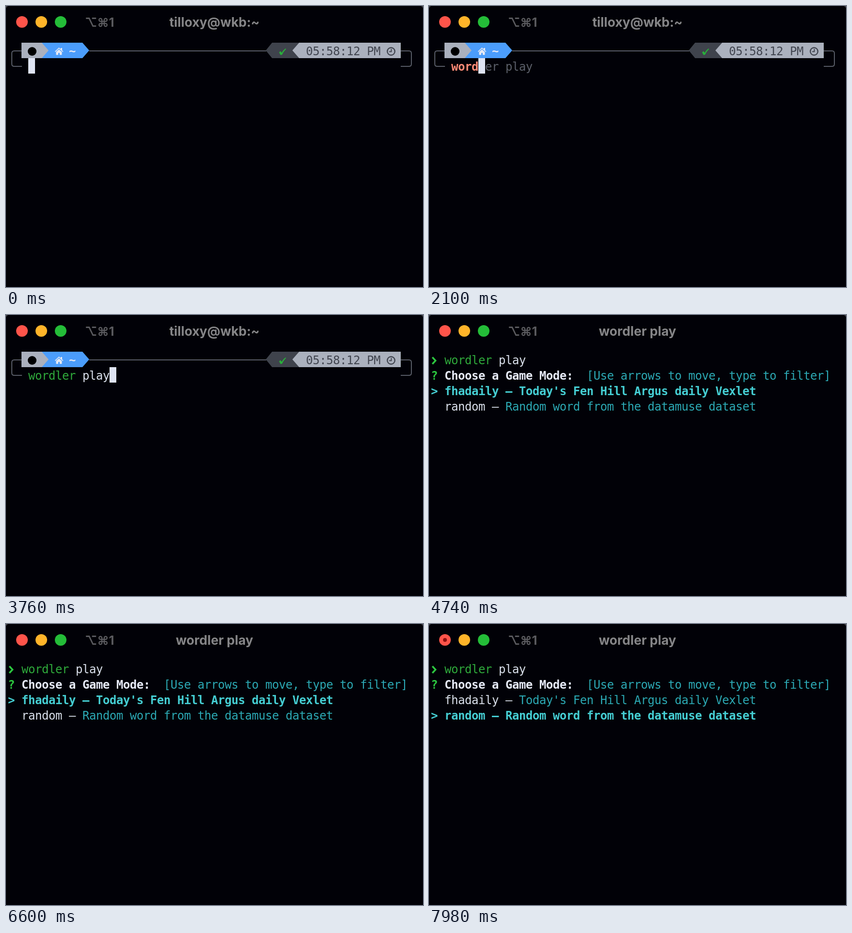
Animation of 862 by 582 pixels, one loop 8 s. Source, as an HTML page:

```html
<!DOCTYPE html>
<html lang="en">
<head>
<meta charset="utf-8">
<title>Terminal</title>
<style>
  html, body { margin: 0; width: 100%; height: 100%; overflow: hidden; background: #010107; }
  svg { display: block; width: 100vw; height: 100vh; }
  text { white-space: pre; }
  .mono { font: 24px "DejaVu Sans Mono", monospace; letter-spacing: -.449px; }
  .bar { font: 700 26.5px Inter, "DejaVu Sans", sans-serif; }
  .keys { font-size: 25px; }
  .bold { font-weight: 700; }
  .line { fill: none; stroke: #585c66; stroke-width: 2; }
</style>
</head>
<body>
<svg viewBox="0 0 862 582">
  <path d="M0 0h4L0 4zM862 0h-4l4 4z" fill="#3a3a40"/>
  <circle cx="33" cy="33" r="12" fill="#ff544a"/>
  <circle id="dot" cx="33" cy="33" r="4" fill="#8c1010"/>
  <circle cx="73" cy="33" r="12" fill="#ffb429"/>
  <circle cx="113" cy="33" r="12" fill="#24bd38"/>
  <text class="bar keys" x="163" y="43" fill="#5b5b5f">⌥⌘1</text>
  <text class="bar" id="title" x="431" y="43" fill="#858587" text-anchor="middle"></text>

  <g id="shell">
    <path class="line" d="M32 93H17q-5 0-5 5v22q0 5 5 5h16M172 93H538M816 93h17q5 0 5 5v22q0 5-5 5h-17"/>
    <path d="M74 76h84l14 16-14 16H74z" fill="#4b9dfb"/>
    <path d="M32 76h42l14 16-14 16H32z" fill="#abb1bd"/>
    <circle cx="54" cy="94" r="9" fill="#000"/>
    <path d="M101 94l8.500-8 3.500 3.200V87h3v5l2.500 2-1.200 1.300-7.800-7-7.300 7zM103.500 95.300l6-5.300 6 5.300v6h-4.500v-4h-3v4h-4.500z" fill="#e6eaf4"/>
    <text class="mono bold" x="130" y="102" fill="#e2e7f4">~</text>
    <path d="M606 76h-56l-13 16 13 16h56z" fill="#3f434c"/>
    <path d="M816 76H606l-14 16 14 16h210z" fill="#abb1bd"/>
    <path d="M564.500 96l3-2.500 2.500 3.500q3-6 8-9l1 1q-5 5-8.500 12l-3 .5z" fill="#28b03a"/>
    <text class="mono" x="620" y="102" fill="#424650">05:58:12 PM</text>
    <g fill="none" stroke="#424650">
      <circle cx="796" cy="94" r="7.800" stroke-width="2.400"/>
      <path d="M796.500 89v5.500H792" stroke-width="2"/>
    </g>
    <g id="prompt" class="mono"></g>
    <rect id="cursor" y="108" width="14" height="32" fill="#dfe4f3"/>
  </g>

  <g id="game">
    <path d="M7 87.500l6.500 7L7 101.500" fill="none" stroke="#2cc840" stroke-width="3.500"/>
    <g id="menu" class="mono"></g>
  </g>
</svg>
<script>
const LOOP = 8000;
const KEYS = [800, 1250, 1680, 2100, 2520, 2960];
const ACCEPT = 3400, LAUNCH = 4440, DIRTY = 7700, DOWN = 7740;
const CMD = 'wordler', LINE = CMD + ' play';
const C = {
  cmd: '#2fab3c', ask: '#2cc840', text: '#dbe1ec', strong: '#e6eaf6',
  bad: '#ff8a76', hint: '#5b5f69', info: '#2ca9b4', pick: '#45cdd2'
};
const MODES = [
  ['fhadaily', "Today's Fen Hill Argus daily Vexlet"],
  ['random', 'Random word from the datamuse dataset']
];

const $ = id => document.getElementById(id);
const colX = col => 4 + 14 * col;

function run(col, row, str, fill, bold) {
  const cls = bold ? ' class="bold"' : '';
  return `<text x="${colX(col)}" y="${102 + 32 * row}" fill="${fill}"${cls}>${str}</text>`;
}

function promptLine(count, settled) {
  const done = count === LINE.length;
  const typed = LINE.slice(0, Math.min(count, CMD.length));
  const valid = done || count < 2 || !settled;
  const head = run(3, 1, typed, valid ? C.cmd : C.bad, !valid);
  if (!count) return head;
  return head + (done
    ? run(3 + CMD.length, 1, LINE.slice(CMD.length), C.text)
    : run(4 + count, 1, LINE.slice(count + 1), C.hint));
}

function menuLines(picked) {
  const rows = MODES.map(([name, info], i) => {
    const row = i + 2, label = name + ' – ';
    return i === picked
      ? run(0, row, '&gt; ' + label + info, C.pick, true)
      : run(2, row, label, C.text) + run(2 + label.length, row, info, C.info);
  });
  return run(2, 0, CMD, C.cmd) + run(10, 0, 'play', C.text) +
    run(0, 1, '?', C.ask, true) + run(2, 1, 'Choose a Game Mode:', C.strong, true) +
    run(23, 1, '[Use arrows to move, type to filter]', C.info) + rows.join('');
}

let last = '';
function draw(t) {
  const playing = t >= LAUNCH;
  const count = t >= ACCEPT ? LINE.length : KEYS.filter(k => t >= k).length;
  const settled = t >= KEYS[1] + 40;
  const picked = t >= DOWN ? 1 : 0;
  const dirty = t >= DIRTY;
  const state = [playing, count, settled, picked, dirty].join();
  if (state === last) return;
  last = state;

  $('title').textContent = playing ? LINE : 'tilloxy@wkb:~';
  $('dot').style.display = dirty ? '' : 'none';
  $('shell').style.display = playing ? 'none' : '';
  $('game').style.display = playing ? '' : 'none';
  $('prompt').innerHTML = promptLine(count, settled);
  $('cursor').setAttribute('x', colX(3 + count));
  $('menu').innerHTML = menuLines(picked);
}

const start = performance.now();
function tick() {
  draw((performance.now() - start) % LOOP);
  requestAnimationFrame(tick);
}
tick();
</script>
</body>
</html>
```
